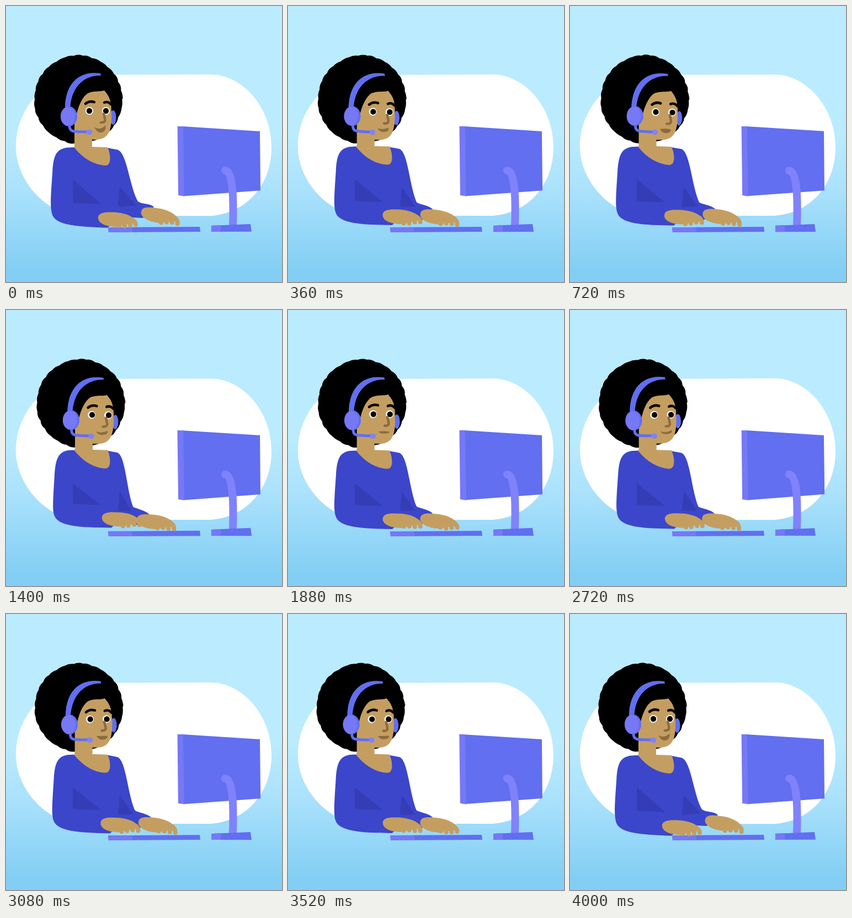
An HTML page with a canvas that plays this animation: 500x500 px, repeating every 4.04 s.

```html
<!DOCTYPE html>
<html lang="en">
<head>
<meta charset="utf-8">
<title>Support desk</title>
<style>
html, body { margin: 0; width: 100%; height: 100%; overflow: hidden; background: #bcecff; }
canvas { display: block; width: 100vw; height: 100vh; }
</style>
</head>
<body>
<canvas id="stage" width="500" height="500"></canvas>
<script>
const ctx = document.getElementById('stage').getContext('2d');
const LOOP = 4040, STEP = 40, CYCLE = 4000;
const { PI, sin, cos, max, min, floor } = Math;
const TAU = PI * 2;
const SKIN = '#c49e61', BROWN = '#8c6b3e', SHIRT = '#3c46ca', SHADE = '#343db5';
const BLUE = '#616ff0', LIGHT = '#7678f5', PALE = '#8082fb';

function poseAt(u) {
  const wave = n => cos(TAU * n * u);
  // slow lean towards the desk with a typing bob on top
  const bob = cos(TAU * (4 * u - 1.4)) - cos(TAU * 1.4);
  const lean = 0.72 * max(0, sin(PI * u)) ** 0.6 + 0.18 * bob;
  const nod = 2 * sin(3 * PI * u) * (1 - 0.7 * u);
  return {
    lean, nod,
    headX: 3 * sin(PI * u ** 0.7),
    tilt: 0.036 * sin(TAU * u) * (1 - u),
    mouthX: lean - 1.5 * sin(TAU * u),
    smile: max(0, 0.3 + 0.45 * wave(3) + 0.25 * wave(1)),
    open: 0.5 + 0.25 * wave(1) + 0.25 * wave(5)
  };
}

// slight hand-drawn wobble, redrawn a few times a second
let boil = 0, salt = 0;
function rough(amount) {
  const s = sin(++salt * 12.9898 + boil * 78.233) * 43758.5453;
  return (s - floor(s) - 0.5) * 2 * amount;
}

// each part is a point (2 numbers) or a bezier (6 numbers)
function trace(parts) {
  ctx.beginPath();
  for (const part of parts) {
    const p = part.map(n => n + rough(0.2));
    if (p.length === 2) ctx.lineTo(...p);
    else ctx.bezierCurveTo(...p);
  }
}

function shape(color, ...parts) {
  trace(parts);
  ctx.fillStyle = color;
  ctx.fill();
}

function line(color, width, ...parts) {
  trace(parts);
  ctx.lineWidth = width;
  ctx.lineCap = ctx.lineJoin = 'round';
  ctx.strokeStyle = color;
  ctx.stroke();
}

function oval(color, x, y, rx, ry = rx) {
  ctx.beginPath();
  ctx.ellipse(x, y, rx, ry, 0, 0, TAU);
  ctx.fillStyle = color;
  ctx.fill();
}

// draws around a pivot that has been moved and turned
function placed(x, y, turn, draw) {
  ctx.save();
  ctx.translate(x, y);
  ctx.rotate(turn);
  draw();
  ctx.restore();
}

function backdrop() {
  const g = ctx.createLinearGradient(0, 230, 0, 480);
  g.addColorStop(0, '#bbebff');
  g.addColorStop(0.4, '#abe2fc');
  g.addColorStop(1, '#82cef4');
  ctx.fillStyle = g;
  ctx.fillRect(0, 0, 500, 500);
  shape('#fff', [150, 125], [370, 124], [430, 124, 481, 185, 481, 255],
    [481, 325, 435, 376, 370, 380], [130, 380], [70, 375, 18, 315, 18, 255],
    [18, 195, 60, 125, 150, 125]);
}

function monitor() {
  shape(BLUE, [319, 218], [460, 227], [461, 334], [321, 344.5]);
  shape(LIGHT, [310.5, 218], [321, 218], [323, 344.5], [312, 343]);
  line(PALE, 14, [397, 298], [410, 298, 413, 340, 411, 398]);
  shape(BLUE, [372, 398], [443, 395], [445, 409], [372, 409]);
  shape(LIGHT, [372, 398], [389, 397], [389, 409], [372, 409]);
}

function keyboard() {
  shape(BLUE, [185, 401], [351, 400], [352, 409], [186, 410]);
  shape(LIGHT, [185, 401], [228, 401], [229, 409], [186, 410]);
}

function hair() {
  const bumps = 30;
  ctx.beginPath();
  for (let i = 0; i <= bumps; i++) {
    const a = i / bumps * TAU, m = a - PI / bumps;
    const r = 79.5 + sin(i * i) * 0.6, out = 82 + sin(i * 5) * 0.8 + rough(0.3);
    ctx.quadraticCurveTo(131 + cos(m) * out, 169.5 + sin(m) * out,
      131 + cos(a) * r, 169.5 + sin(a) * r);
  }
  ctx.fillStyle = '#000';
  ctx.fill();
}

function mouth({ smile: s, open: o }) {
  const y = 221 - 2 * s;
  shape(BROWN, [160, y], [167, 220 + 4 * s, 174, 220 + 3 * s, 180, 221 - 5 * s],
    [182, 223 + 2 * o, 177, 224 + 6 * o, 169, 224 + 5 * o], [164, 224 + 3 * o, 162, 223, 160, y]);
}

function face(p) {
  shape(SKIN, [124, 225], [126, 190, 136, 166, 148, 158], [160, 153, 170, 156, 178, 153],
    [184, 160, 192, 168, 191, 195], [192, 225, 186, 241, 165, 242], [125, 242]);
  placed(0, p.nod, 0, () => {
    line('#080604', 4.6, [144, 177], [149, 173, 154, 172, 160, 174]);
    line('#080604', 4.6, [178, 175], [182, 173, 187, 174, 190, 178]);
    for (const x of [151, 181]) {
      oval('#fff', x, 190, 7);
      oval('#050505', x + p.lean, 190, 5.2);
    }
    line(BROWN, 4.4, [177, 195], [178, 203, 184, 211, 172, 211]);
  });
  placed(p.mouthX, p.nod * 0.8, 0, () => mouth(p));
}

function headset() {
  shape(BLUE, [107, 188], [106, 148, 126, 116, 171, 122], [172, 126], [140, 125, 117, 148, 116, 188]);
  line(BLUE, 5, [115, 212], [115, 228, 116, 228, 148, 228]);
  oval(PALE, 151, 228.5, 5.2, 4.8);
  oval(BLUE, 114, 200, 15, 18);
  oval(LIGHT, 112, 200, 13, 17);
}

function torso(k) {
  const x = 4 * k, y = -2 * k, low = -5.5 * k;
  const lx = 7 * k, ly = -7.5 * k, rx = -8.5 * k, ry = 6.5 * k;
  shape(SHIRT, [124, 256 + y], [92 + x, 255 + y, 86 + x, 267 + y, 84 + x, 300],
    [81 + x, 345, 80 + x, 360, 83 + x, 376 + low], [88 + x, 398 + low, 130 + x, 400 + low, 184 + lx, 402 + ly],
    [205 + lx, 382 + ly], [248 + rx, 384 + ry], [268 + rx, 364 + ry],
    [261 + rx, 357 + ry, 246 + rx, 360, 239 + rx, 354 + ry / 2],
    [223 + rx * 0.6, 325, 219 + rx * 0.3, 261 + y, 200, 260 + y], [184, 257 + y]);
  shape(SHADE, [121, 314], [172, 359 + low], [121, 357 + low]);
  shape(SHADE, [206, 328], [236 + rx, 361 + ry / 2], [203, 364]);
  shape(SKIN, [124, 254 + y], [184, 256 + y], [190, 270 + y, 191, 289 + y, 180, 289 + y],
    [160, 288 + y, 140, 277 + y, 124, 257 + y]);
}

function hand(x, y, turn, beat) {
  placed(x, y, turn, () => {
    shape(SKIN, [0, 11], [-1, -1, 14, -1, 34, 0], [54, 2, 67, 9, 71, 20],
      [60, 20], [34, 26], [14, 26, 1, 20, 0, 11]);
    for (let i = 0; i < 4; i++) {
      const tip = 24 - i * 0.4 + sin(beat + i * 1.7);
      line(SKIN, 8, [34 + 9 * i, 13], [38 + 9 * i, 15, 38 + 10 * i, 18, 38 + 10 * i, tip]);
    }
  });
}

function draw(t) {
  const u = min(1, t / CYCLE), p = poseAt(u), k = p.lean;
  const inHead = part => placed(140 + p.headX, 250, p.tilt, () => {
    ctx.translate(-140, -250);
    part(p);
  });
  boil = floor(t % CYCLE / 120);
  salt = 0;
  backdrop();
  monitor();
  inHead(hair);
  inHead(() => oval(BLUE, 194, 202, 5.5, 13));
  ctx.fillStyle = SKIN;
  ctx.fillRect(124 + k, 205, 32, 55);
  inHead(face);
  torso(k);
  inHead(headset);
  keyboard();
  const beat = u * TAU * 12;
  hand(167 + 7 * k, 374 - 7.5 * k, 0, beat);
  hand(246 - 8.5 * k, 363 + 6.5 * k, 0.12 - 0.07 * k, beat + 2);
}

const start = performance.now();
function tick() {
  const t = (performance.now() - start) % LOOP;
  draw(floor(t / STEP) * STEP);
  requestAnimationFrame(tick);
}
draw(0);
requestAnimationFrame(tick);
</script>
</body>
</html>
```
